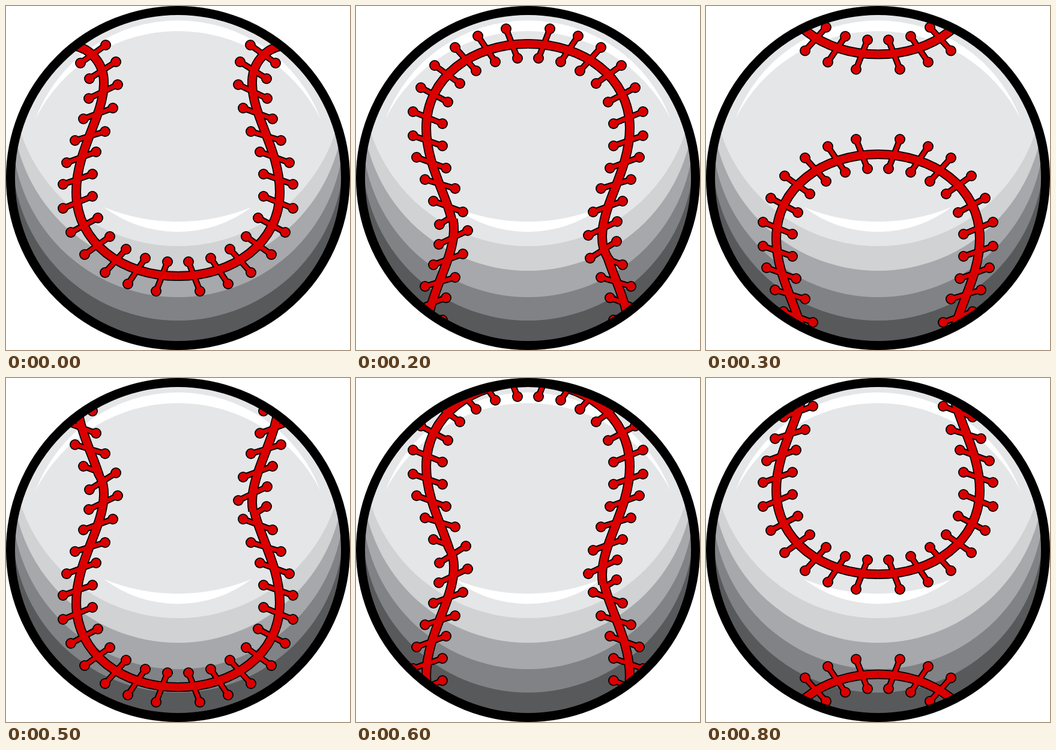
Animation, 573 px wide and 573 px high, one loop 900 ms. Source, as an HTML page with a canvas:

```html
<!DOCTYPE html>
<html lang="en">
<head>
<meta charset="utf-8">
<title>Spinning baseball</title>
<style>
  html, body { margin: 0; width: 100%; height: 100%; overflow: hidden; background: #fff; }
  canvas { display: block; }
</style>
</head>
<body>
<canvas id="stage" width="573" height="573"></canvas>
<script>
const ctx = document.getElementById('stage').getContext('2d');
const SIZE = 573, MID = SIZE / 2, STEP_MS = 100;
const PERIOD = 796.5;   // distance between two seam loops
const MIRROR = 270;     // the upper half of a loop is the lower half flipped: y -> MIRROR - y
const RED = '#db0000';

// Left half of the seam, from the narrow waist to the bottom.
const seam = new Path2D('M112 66C140 70 164 95 163 130C162 185 117 240 117 310C117 395 195 450 286.5 450');

// Each stitch: outer x, y, inner x, y.
const stitches = [
  [124, 95, 166, 65], [139, 121, 183, 93], [138, 154, 186, 131], [129, 188, 178, 170],
  [115, 224, 165, 209], [101, 261, 150, 243], [95, 297, 144, 280], [95, 337, 144, 317],
  [108, 377, 153, 353], [131, 414, 173, 384], [165, 444, 200, 405], [203, 463, 232, 420],
  [250, 475, 269, 426]
];

// How the halves meet, left then right: cut height, first whole stitch of
// the lower and upper half, and the stitch of each that shows only its outer end.
const side = (cut, low, up, lowHalf = -1, upHalf = -1) => ({ cut, low, up, lowHalf, upHalf });
const open = [side(-99, 0, 13), side(-99, 0, 13)];
const tight = [side(111, 2, 3, 1), side(179, 4, 1, 3)];
const loose = [side(98, 1, 4, -1, 3), side(158, 3, 2, -1, 1)];

const poses = [
  [0, open], [121, tight], [243, tight], [427, tight], [673.5, loose],
  [65, loose], [187, loose], [427, tight], [673.5, loose]
];

const passes = [
  { color: '#000', seam: 16, thread: 10.5, knot: 9 },
  { color: RED, seam: 12.5, thread: 6.5, knot: 7.2 }
];

function disc(x, y, r, color) {
  ctx.fillStyle = color;
  ctx.beginPath();
  ctx.arc(x, y, r, 0, Math.PI * 2);
  ctx.fill();
}

function drawStitch([ox, oy, ix, iy], pass, half) {
  ctx.lineWidth = pass.thread;
  ctx.beginPath();
  ctx.moveTo(ox, oy);
  ctx.lineTo(half ? (ox + ix) / 2 : ix, half ? (oy + iy) / 2 : iy);
  ctx.stroke();
  disc(ox, oy, pass.knot, pass.color);
  if (!half) disc(ix, iy, pass.knot, pass.color);
}

function drawHalf(pass, cut, first, halfIndex) {
  ctx.strokeStyle = pass.color;
  ctx.save();
  ctx.beginPath();
  ctx.rect(0, cut, MID + 1, 900);
  ctx.clip();
  ctx.lineWidth = pass.seam;
  ctx.stroke(seam);
  ctx.restore();
  stitches.forEach((s, i) => {
    if (i >= first || i === halfIndex) drawStitch(s, pass, i === halfIndex);
  });
}

function drawLoop(offset, joints, pass) {
  joints.forEach((j, i) => {
    ctx.save();
    ctx.translate(0, offset);
    if (i) ctx.transform(-1, 0, 0, 1, SIZE, 0);
    drawHalf(pass, j.cut, j.low, j.lowHalf);
    ctx.transform(1, 0, 0, -1, 0, MIRROR);
    drawHalf(pass, MIRROR - j.cut, j.up, j.upHalf);
    ctx.restore();
  });
}

function drawShading() {
  disc(MID, MID, 280, '#58595b');
  const bands = [[248, '#808285'], [209, '#a6a8ab'], [165, '#d0d2d3'], [124, '#e5e6e8']];
  for (const [y, color] of bands) disc(MID, y, 276, color);
  ctx.fillStyle = '#fff';
  ctx.fill(new Path2D('M49 188A254 254 0 0 1 524 188A266 266 0 0 0 49 188Z'));
  ctx.fill(new Path2D('M163 335A325 325 0 0 0 409 335A204 204 0 0 1 163 335Z'));
}

function draw([offset, joints]) {
  ctx.fillStyle = '#fff';
  ctx.fillRect(0, 0, SIZE, SIZE);
  ctx.save();
  ctx.beginPath();
  ctx.arc(MID, MID, 279, 0, Math.PI * 2);
  ctx.clip();
  drawShading();
  for (const pass of passes) {
    for (const turn of [-1, 0, 1]) drawLoop(offset + turn * PERIOD, joints, pass);
  }
  ctx.restore();
  ctx.strokeStyle = '#000';
  ctx.lineWidth = 15;
  ctx.beginPath();
  ctx.arc(MID, MID, 279, 0, Math.PI * 2);
  ctx.stroke();
}

let start;
function tick(now) {
  start ??= now;
  draw(poses[Math.floor((now - start) / STEP_MS) % poses.length]);
  requestAnimationFrame(tick);
}
draw(poses[0]);
requestAnimationFrame(tick);
</script>
</body>
</html>
```
